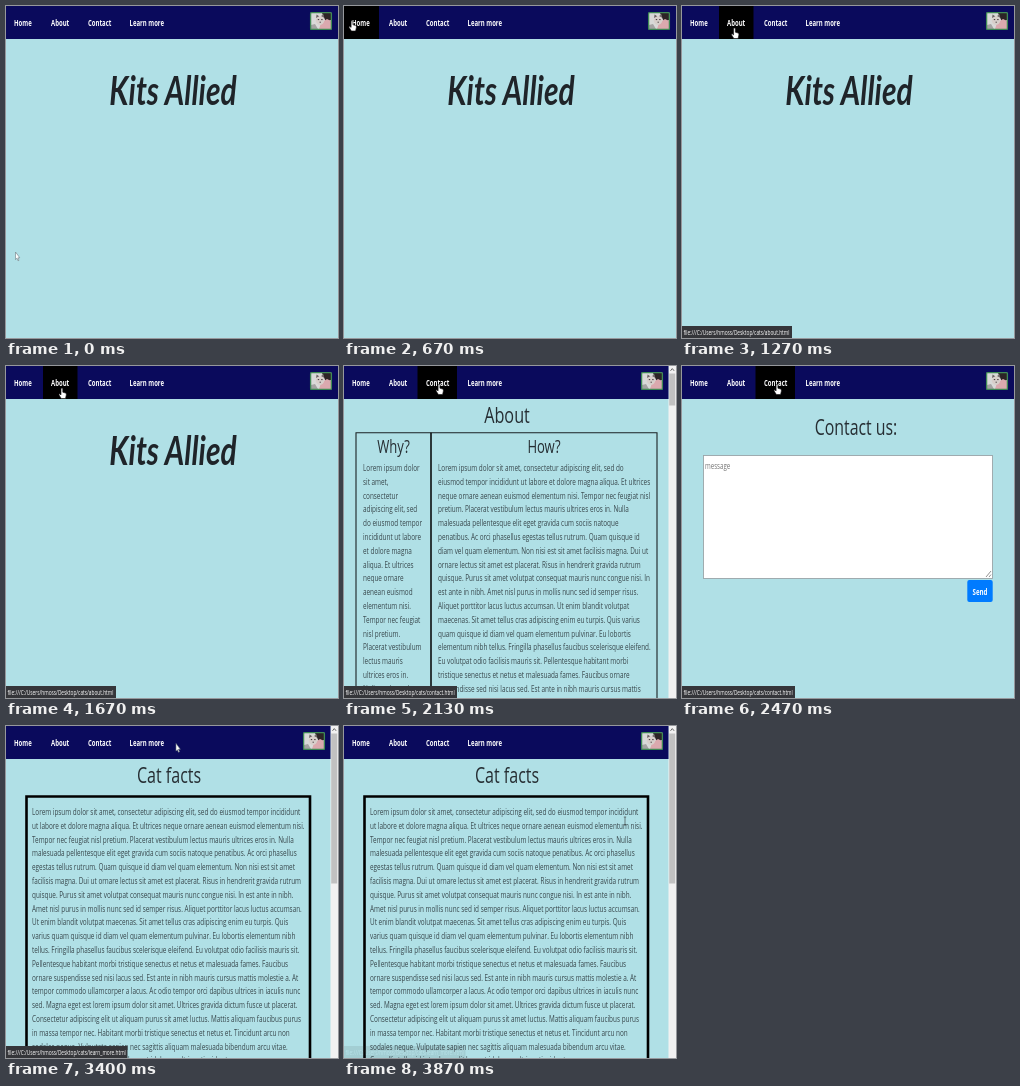
An HTML page that plays this animation: 332x332 px, repeating every 3.94 s.

```html
<!DOCTYPE html>
<html lang="en">
<head>
<meta charset="utf-8">
<title>Cat site tour</title>
<style>
  html, body { margin: 0; width: 100%; height: 100%; overflow: hidden; background: #b0e0e6; }
  svg { display: block; width: 100vw; height: 100vh; }
  text { font-family: "Open Sans", "Noto Sans", sans-serif; fill: #262e33; white-space: pre; }
  .copy { fill: #38474c; }
  .nav { font-weight: 700; fill: #fff; }
  .brand { font: italic 700 40px Lato, sans-serif; fill: #1f2429; }
</style>
</head>
<body>
<svg id="stage" viewBox="0 0 332 332" preserveAspectRatio="none"></svg>
<script>
const LOOP = 3940, FPS = 15, SQUEEZE = 0.75, LEADING = 13.8, BAR = 33;

const LOREM = `Lorem ipsum dolor sit amet, consectetur adipiscing elit, sed do eiusmod tempor
incididunt ut labore et dolore magna aliqua. Et ultrices neque ornare aenean euismod elementum nisi.
Tempor nec feugiat nisl pretium. Placerat vestibulum lectus mauris ultrices eros in. Nulla malesuada
pellentesque elit eget gravida cum sociis natoque penatibus. Ac orci phasellus egestas tellus rutrum.
Quam quisque id diam vel quam elementum. Non nisi est sit amet facilisis magna. Dui ut ornare lectus
sit amet est placerat. Risus in hendrerit gravida rutrum quisque. Purus sit amet volutpat consequat
mauris nunc congue nisi. In est ante in nibh. Amet nisl purus in mollis nunc sed id semper risus.
Aliquet porttitor lacus luctus accumsan. Ut enim blandit volutpat maecenas. Sit amet tellus cras
adipiscing enim eu turpis. Quis varius quam quisque id diam vel quam elementum pulvinar. Eu lobortis
elementum nibh tellus. Fringilla phasellus faucibus scelerisque eleifend. Eu volutpat odio facilisis
mauris sit. Pellentesque habitant morbi tristique senectus et netus et malesuada fames. Faucibus
ornare suspendisse sed nisi lacus sed. Est ante in nibh mauris cursus mattis molestie a. At tempor
commodo ullamcorper a lacus. Ac odio tempor orci dapibus ultrices in iaculis nunc sed. Magna eget est
lorem ipsum dolor sit amet. Ultrices gravida dictum fusce ut placerat. Consectetur adipiscing elit ut
aliquam purus sit amet luctus. Mattis aliquam faucibus purus in massa tempor nec. Habitant morbi
tristique senectus et netus et. Tincidunt arcu non sodales neque. Vulputate sapien nec sagittis aliquam
malesuada bibendum arcu vitae. Convallis tellus id interdum velit laoreet id donec ultrices tincidunt`.split(/\s+/);

// Words per line in each text column
const WRAP = {
  why: [3, 2, 1, 3, 3, 3, 3, 3, 2, 2, 2, 3, 2, 2, 2, 3, 2],
  how: [10, 11, 10, 9, 8, 10, 13, 11, 11, 14, 9, 11, 10, 8, 9, 9, 12],
  facts: [13, 14, 13, 12, 15, 15, 15, 15, 14, 13, 12, 11, 16, 14, 15, 13, 14, 11, 10]
};

const NAV = [
  { label: 'Home', x: 8, from: 0, to: 35 },
  { label: 'About', x: 45, from: 37, to: 71.5 },
  { label: 'Contact', x: 82, from: 73.5, to: 113 },
  { label: 'Learn more', x: 123.5, from: 116, to: 165 }
];

const PAGES = [[0, 'home'], [1730, 'about'], [2460, 'contact'], [3330, 'facts']];
const STATUS = [
  [0, '', 0], [860, 'index', 109], [1195, 'about', 110],
  [1995, 'contact', 113], [2860, 'learn_more', 121.5]
];
const PATH = [
  [0, 9.5, 246], [70, 11, 240], [200, 38, 165], [330, 41, 85], [470, 14, 24], [600, 8, 14.5],
  [800, 8, 14.5], [930, 11, 17], [1070, 13, 18], [1135, 22, 20], [1200, 42, 22], [1270, 53, 22],
  [1600, 54, 22], [1740, 58, 22], [2000, 88, 19], [2130, 95, 18], [2600, 95, 18], [2860, 130, 20],
  [3130, 147.5, 20.5], [3330, 150, 19], [3470, 190, 16], [3600, 232, 42], [3860, 281, 95]
];

const text = (s, x, y, size, attrs = '') =>
  `<text transform="translate(${x} ${y}) scale(${SQUEEZE} 1)" font-size="${size}" ${attrs}>${s}</text>`;
const centred = (s, x, y, size, attrs = '') => text(s, x, y, size, `text-anchor="middle" ${attrs}`);
const box = (x, y, w, h, fill, attrs = '') =>
  `<rect x="${x}" y="${y}" width="${w}" height="${h}" fill="${fill}" ${attrs}/>`;
const page = (id, body) => `<g id="${id}" display="none">${body}</g>`;

function column(counts, x, y) {
  let at = 0;
  return counts.map((n, i) =>
    text(LOREM.slice(at, at += n).join(' '), x, y + i * LEADING, 8.52, 'class="copy"')).join('');
}

const scrollbar = thumb =>
  box(324.5, 0, 7.5, 332, '#f1f1f1') + box(325.2, 7.5, 6, thumb, '#c1c1c1') +
  '<path d="M326.5 4.8l1.8-2.2 1.8 2.2" fill="none" stroke="#555" stroke-width=".9"/>';

const avatar = `<g id="avatar">
  ${box(304.6, 6.6, 20.8, 16.8, '#d9d9d8')}
  <path d="M316 7h9v7l-5 2z" fill="#2c2426"/>
  <path d="M313 23l2-6 6-4 4 2v8z" fill="#dba9ae"/>
  <ellipse cx="314" cy="14.5" rx="4.2" ry="4.4" fill="#d8cfcb"/>
  <path d="M310 12l.6-3.6 2.6 1.8zM315 10l2.8-1.8.4 3.6z" fill="#6b6264"/>
  <path d="M305 19l4-1 3 5h-7z" fill="#a5a3a3"/>
  <path d="M311.8 13.6h1.4M315.2 13.6h1.4M313.6 16.2h1.2" stroke="#3c3335"/>
  ${box(304.6, 6.6, 20.8, 16.8, 'none', 'rx="1" stroke="#3f8a55" stroke-width="1.3"')}
</g>`;

const stage = document.getElementById('stage');
stage.innerHTML =
  box(0, 0, 332, 332, '#b0e0e6') +
  page('home', centred('Kits Allied', 167, 98.5, 40, 'class="brand"')) +
  page('about',
    centred('About', 163, 57, 21.6) +
    '<path d="M313 340V66.8H12V340" fill="none" stroke="#1b2224" stroke-width="1.1"/>' +
    '<path d="M87 66.8V340" stroke="#000" stroke-width="1.5"/>' +
    centred('Why?', 49.5, 86.5, 17.4) + centred('How?', 200, 86.5, 17.4) +
    column(WRAP.why, 19, 105) + column(WRAP.how, 94, 105) + scrollbar(32)) +
  page('contact',
    centred('Contact us:', 174, 69, 21.2) +
    box(21.5, 89.5, 289, 123, '#fff', 'stroke="#9aa5a8" stroke-width=".9"') +
    text('message', 23, 102.5, 8.2, 'style="fill:#757575"') +
    '<path d="M304 211l5-6M307 211l2-2.4" stroke="#777" stroke-width=".8"/>' +
    box(285.3, 214, 25.4, 22, '#007bff', 'rx="2"') +
    centred('Send', 298, 229, 8.2, 'class="nav"')) +
  page('facts',
    centred('Cat facts', 163, 57, 21.4) +
    '<path d="M304 340V70.5H20.5V340" fill="none" stroke="#000" stroke-width="2.6"/>' +
    column(WRAP.facts, 26, 89) + scrollbar(150)) +
  box(0, 0, 332, BAR, '#0a0a5c', 'id="bar"') +
  box(0, 0, 0, BAR, '#000', 'id="hover"') +
  NAV.map(n => text(n.label, n.x, 19.8, 8, 'class="nav"')).join('') +
  avatar +
  `<g id="status">${box(0, 320, 110, 12, '#35363a', 'id="tip"')}
    ${text('', 1.5, 329, 6.4, 'id="link" style="fill:#fff"')}</g>` +
  `<g id="cursor">
    <path id="arrow" d="M0 0v7.6l1.4-1.4 1.1 2.6 1-.5-1.1-2.5h1.9z" fill="#fff" stroke="#6d7b80" stroke-width=".6"/>
    <path id="hand" d="M-.9.8q.9-1.5 1.8 0v3.4l2.8.9q.9.4.7 1.8l-.8 3.6h-4.2l-2.3-3.6q-.3-1.2.8-1l1.2 1z"
      fill="#fff" stroke="#111" stroke-width=".6"/>
    <path id="beam" d="M-1.2-4h2.4M0-4v8M-1.2 4h2.4" fill="none" stroke="#333" stroke-width=".6"/>
  </g>`;

const el = id => document.getElementById(id);
const show = (id, on) => el(id).setAttribute('display', on ? 'inline' : 'none');
const latest = (table, t) => table.filter(row => row[0] <= t).pop();

function cursorAt(t) {
  const next = PATH.findIndex(p => p[0] > t);
  if (next < 0) return PATH[PATH.length - 1].slice(1);
  const [t0, x0, y0] = PATH[next - 1], [t1, x1, y1] = PATH[next];
  const k = (t - t0) / (t1 - t0);
  return [x0 + (x1 - x0) * k, y0 + (y1 - y0) * k];
}

function draw(ms) {
  const t = Math.floor((ms + 4) * FPS / 1000) * 1000 / FPS;
  const current = latest(PAGES, t)[1];
  PAGES.forEach(([, id]) => show(id, id === current));

  const scrolls = current === 'about' || current === 'facts';
  el('bar').setAttribute('width', scrolls ? 324.5 : 332);
  el('avatar').setAttribute('transform', `translate(${scrolls ? -7 : 0} 0)`);

  const [x, y] = cursorAt(t);
  const item = y < BAR && NAV.find(n => x >= n.from && x < n.to);
  el('hover').setAttribute('x', item ? item.from : 0);
  el('hover').setAttribute('width', item ? item.to - item.from : 0);

  const [, file, width] = latest(STATUS, t);
  show('status', !!file);
  el('tip').setAttribute('width', width);
  el('link').textContent = `file:///C:/Users/hmoss/Desktop/cats/${file}.html`;
  el('status').setAttribute('opacity', Math.max(0.1, Math.min(1, 1 - (t - 3500) / 360)));

  const reading = current === 'facts' && y > 72;
  el('cursor').setAttribute('transform', `translate(${x} ${y})`);
  show('hand', !!item);
  show('beam', reading);
  show('arrow', !item && !reading);
}

const start = performance.now();
function tick() {
  draw((performance.now() - start) % LOOP);
  requestAnimationFrame(tick);
}
tick();
</script>
</body>
</html>
```
